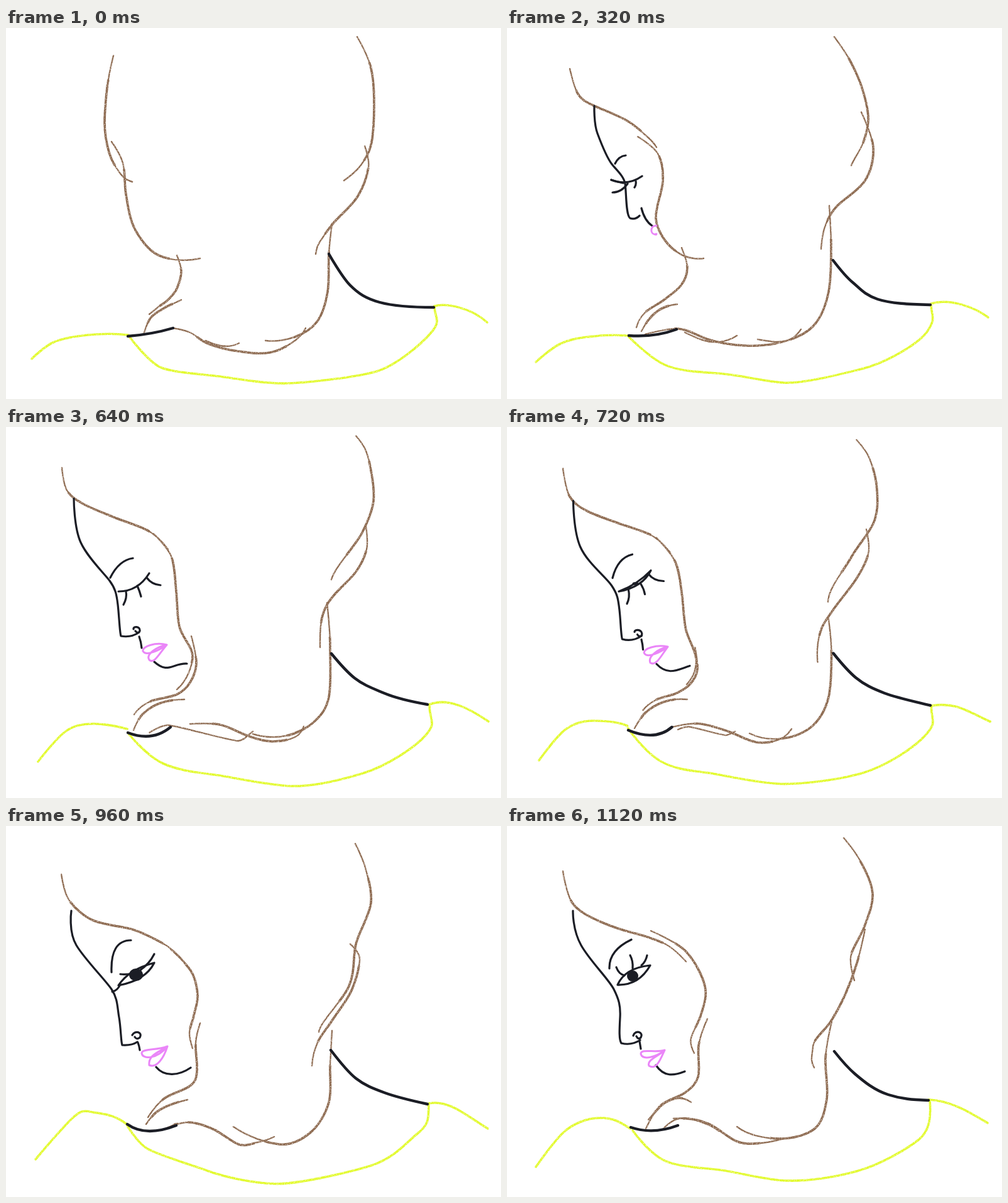
An HTML page without scripts that plays this animation: 788 px wide and 591 px high, repeating every 1200 ms.

```html
<!DOCTYPE html>
<html lang="en">
<head>
<meta charset="utf-8">
<title>Turning head</title>
<style>
html, body { margin: 0; width: 100%; height: 100%; overflow: hidden; background: #fff; }
svg { display: block; width: 788px; height: 591px; }
path { fill: none; stroke-linecap: round; stroke-linejoin: round; }
path, ellipse { animation: 1.2s steps(2) infinite; }
.brown path { stroke: #8d6a50; stroke-width: 2.4; }
.brown .mid { stroke-width: 3.7; stroke-dasharray: 64 36; stroke-dashoffset: -18; stroke-linecap: butt; }
.ink path { stroke: #1b1d25; stroke-width: 3.2; }
.ink .bold { stroke-width: 4.4; }
.lime path { stroke: #e2fa2c; stroke-width: 3.6; }
.pink path { stroke: #ea86f8; stroke-width: 3; }

/* moments at which parts come into view */
.turn, .face, .lower, .wisp { animation: 1.2s step-end infinite; }
.turn { animation-name: turn; }
.face { animation-name: face; }
.lower { animation-name: lower; }
.wisp { animation-name: wisp; }
@keyframes turn { 0% { opacity: 0 } 13.33%, 100% { opacity: 1 } }
@keyframes face { 0% { opacity: 0 } 26.66%, 100% { opacity: 1 } }
@keyframes lower { 0% { opacity: 0 } 33.33%, 100% { opacity: 1 } }
@keyframes wisp { 0%, 73.33%, 100% { opacity: 0 } 66.66% { opacity: 1 } }

.crown { animation-name: crown }
@keyframes crown {
0% { d: path("M559 14S575 42 580 60S586 100 586 120S585 166 582 182S573 207 566 217S548 236 538 243"); animation-timing-function: steps(4) }
26.66% { d: path("M521 14S538 37 545 50S559 77 564 92S574 125 575 140S572 167 568 180S554 205 548 219") }
40% { d: path("M546 15S561 30 566 40S575 63 577 75S582 95 581 110S576 148 570 165S549 200 544 212") }
53.33% { d: path("M557 14S569 28 573 38S580 62 582 75S587 102 585 118S577 149 566 170S524 222 518 243") }
66.66% { d: path("M556 27S575 47 581 62S594 95 595 115S596 158 585 180S543 223 530 245S500 290 504 314") }
80% { d: path("M556 28S569 54 573 70S583 102 581 122S562 168 557 188S556 232 546 255S500 312 498 328") }
93.33%, 100% { d: path("M536 19S554 40 562 55S581 90 582 108S575 143 569 160S548 196 547 210S551 239 553 246") }
}
.nape { animation-name: nape }
@keyframes nape {
0% { d: path("M571 188S579 209 577 222S569 253 560 268S531 299 521 311S505 332 500 340S495 350 493 360"); animation-timing-function: steps(4) }
26.66% { d: path("M564 134S582 172 583 190S580 227 570 243S536 272 525 284S510 306 506 317S501 338 500 352") }
40% { d: path("M570 153S579 180 578 195S571 231 561 246S526 276 515 288S499 307 495 318S489 338 491 354") }
53.33% { d: path("M573 159S577 183 574 195S565 220 556 232S531 257 522 268S508 286 504 300S500 330 500 351") }
66.66% { d: path("M571 167S579 191 577 205S566 234 556 252S526 298 516 315S497 341 493 355S485 378 489 398") }
80% { d: path("M548 188S563 200 563 212S557 246 550 262S528 296 519 310S501 333 496 345S488 366 487 382") }
93.33%, 100% { d: path("M570 165S563 198 558 215S546 251 539 267S524 298 515 312S488 338 487 352S482 372 489 385") }
}
.neck { animation-name: neck }
@keyframes neck {
0% { d: path("M519 311S515 342 514 360S515 402 512 420S504 456 495 468S474 487 460 492S430 500 413 498"); animation-timing-function: steps(4) }
26.66% { d: path("M513 283S516 327 516 350S516 400 512 420S501 459 490 472S460 494 445 498S418 499 399 496") }
40% { d: path("M513 296S511 318 512 330S517 353 517 370S516 414 512 430S503 458 495 465S460 485 439 483") }
53.33% { d: path("M511 280S516 325 516 350S518 410 514 430S501 460 490 470S461 489 445 492S412 495 393 489") }
66.66% { d: path("M512 327S517 353 517 370S515 412 510 430S497 468 485 480S453 499 435 500S395 499 379 487") }
80% { d: path("M519 326S517 361 516 380S519 422 514 440S498 477 485 488S455 509 435 507S385 495 362 479") }
93.33%, 100% { d: path("M518 307S508 349 507 370S512 416 509 435S502 472 490 482S455 498 435 498S385 494 366 479") }
}
.hem { animation-name: hem }
@keyframes hem {
0% { d: path("M265 478S284 481 293 485S309 498 322 503S354 513 370 515S402 520 420 517S470 496 477 478"); animation-timing-function: steps(4) }
26.66% { d: path("M220 488S255 478 272 479S302 490 320 496S360 505 380 506S425 504 440 500S460 491 468 480") }
40% { d: path("M313 474S338 477 350 481S373 491 385 496S412 504 425 503S454 500 465 492S484 472 491 456") }
53.33% { d: path("M293 473S325 471 340 474S371 487 385 492S412 501 425 501S452 498 460 494S470 486 474 477") }
66.66% { d: path("M230 484S254 471 270 471S309 474 325 480S353 498 368 503S394 505 405 502S424 493 432 485") }
80% { d: path("M258 480S278 472 290 472S317 477 330 483S359 503 370 507S390 506 400 504S419 499 427 495") }
93.33%, 100% { d: path("M248 483S262 467 275 466S305 468 320 474S351 496 365 502S393 506 405 505S430 501 440 498") }
}
.strand { animation-name: strand }
@keyframes strand {
0% { d: path("M318 498S327 502 333 504S346 507 352 507S365 505 371 502"); animation-timing-function: steps(4) }
26.66% { d: path("M283 485S302 494 311 497S329 501 338 500S357 496 366 490") }
40% { d: path("M236 478S255 474 270 477S309 492 325 493S353 492 366 485") }
53.33% { d: path("M228 487S246 475 258 475S360 501 370 500S385 490 393 485") }
66.66% { d: path("M316 477S320 479 322 480S326 482 327 482S332 484 333 485") }
80% { d: path("M256 481S261 479 263 478S267 476 268 475S273 474 274 474") }
93.33%, 100% { d: path("M265 466S282 465 290 466S307 471 315 474S331 481 337 486") }
}
.fringe { animation-name: fringe }
@keyframes fringe {
0% { d: path("M171 44S163 77 161 95S157 133 157 150S160 184 164 198S176 224 182 232S192 242 201 245"); animation-timing-function: steps(4) }
26.66% { d: path("M100 65S107 95 113 105S126 118 139 124S176 139 190 147S214 165 222 172S234 183 238 190") }
40% { d: path("M87 66S91 91 97 100S109 115 122 121S161 137 180 146S221 168 235 178S254 194 262 205") }
53.33% { d: path("M89 65S91 91 97 101S110 115 122 122S153 136 170 143S207 156 222 163S250 184 258 195") }
66.66% { d: path("M89 67S95 108 103 121S122 141 136 147S167 158 183 163S219 173 232 179S254 196 262 205") }
80% { d: path("M88 77S92 102 98 114S122 143 138 150S177 159 195 163S233 178 248 186S275 206 285 218") }
93.33%, 100% { d: path("M89 72S94 106 103 121S134 146 150 153S184 166 200 170S234 180 248 186S275 205 285 216") }
}
.lock { animation-name: lock }
@keyframes lock {
0% { d: path("M168 181S182 201 186 215S188 247 191 265S197 306 206 322S228 356 245 363S285 372 309 367"); animation-timing-function: steps(4) }
26.66% { d: path("M208 173S233 188 240 200S249 228 248 245S236 286 237 303S250 339 262 350S290 370 313 367") }
40% { d: path("M235 178S261 201 268 215S277 248 279 265S282 300 286 315S298 344 298 357S293 384 288 395") }
53.33% { d: path("M235 170S257 191 263 206S269 243 271 262S272 301 276 318S297 350 297 365S288 405 272 418") }
66.66% { d: path("M240 182S264 207 272 222S283 255 286 272S290 308 293 325S304 360 305 375S304 394 300 402") }
80% { d: path("M262 196S288 220 295 232S304 256 305 268S301 292 299 302S292 321 292 330S295 348 297 354") }
93.33%, 100% { d: path("M229 167S271 185 285 200S311 238 315 255S313 286 309 300S295 328 293 338S295 355 298 362") }
}
.throat { animation-name: throat }
@keyframes throat {
0% { d: path("M272 362S279 379 279 388S275 408 272 415S263 428 258 433S248 440 243 444S233 452 228 456"); animation-timing-function: steps(4) }
26.66% { d: path("M278 350S287 372 287 382S283 402 277 410S259 426 250 433S227 446 220 453S209 466 206 477") }
40% { d: path("M290 348S301 372 302 382S299 401 294 408S282 422 272 427S246 433 235 438S214 450 206 460") }
53.33% { d: path("M295 333S303 363 303 375S298 399 293 407S282 421 272 426S241 432 230 437S210 448 204 458") }
66.66% { d: path("M304 370S305 390 303 397S296 408 290 412S275 419 268 422S251 428 245 432S234 439 229 444") }
80% { d: path("M309 314S303 332 302 345S305 378 304 390S302 407 293 414S263 426 252 434S233 453 226 464") }
93.33%, 100% { d: path("M319 307S307 335 305 350S308 388 304 400S293 418 283 425S255 436 245 445S228 468 221 482") }
}
.curl { animation-name: curl }
@keyframes curl {
0% { d: path("M220 485S225 469 230 462S244 451 252 446S270 438 279 433"); animation-timing-function: steps(4) }
26.66% { d: path("M214 483S221 470 226 464S238 451 246 447S261 441 271 440") }
40% { d: path("M191 481S203 468 210 463S227 455 235 451S252 444 260 440") }
53.33% { d: path("M203 483S210 465 217 458S234 444 245 440S270 434 284 434") }
66.66% { d: path("M203 477S217 457 225 451S240 441 251 437S272 431 290 434") }
80% { d: path("M223 475S232 462 238 457S254 447 262 444S280 438 289 436") }
93.33%, 100% { d: path("M225 468S240 450 247 444S260 436 268 434S284 434 293 440") }
}
.strap { animation-name: strap }
@keyframes strap {
0% { d: path("M514 360S535 397 548 410S573 431 595 437S650 445 681 445"); animation-timing-function: steps(4) }
26.66% { d: path("M519 370S538 395 550 405S569 425 590 432S640 440 674 441") }
40% { d: path("M517 357S541 385 553 396S579 419 598 425S645 436 669 440") }
53.33% { d: path("M518 361S541 389 555 400S583 416 602 424S648 438 671 442") }
66.66% { d: path("M521 360S543 388 556 399S580 417 600 424S655 438 677 445") }
80% { d: path("M517 357S543 391 557 402S584 418 603 425S648 438 671 443") }
93.33%, 100% { d: path("M521 359S540 383 554 395S585 421 607 428S645 436 671 437") }
}
.tab { animation-name: tab }
@keyframes tab {
0% { d: path("M194 491Q232 488 266 478"); animation-timing-function: steps(4) }
26.66% { d: path("M194 490Q235 493 270 480") }
40% { d: path("M190 492Q230 500 266 481") }
53.33% { d: path("M194 487Q233 502 262 478") }
66.66% { d: path("M192 479Q240 500 263 478") }
80% { d: path("M193 475Q222 496 271 477") }
93.33%, 100% { d: path("M197 480Q232 492 272 477") }
}
.sleeve { animation-name: sleeve }
@keyframes sleeve {
0% { d: path("M41 527S62 506 77 500S110 491 130 489S170 486 195 489"); animation-timing-function: steps(4) }
26.66% { d: path("M46 532S70 510 85 503S112 494 130 492S165 488 189 490") }
40% { d: path("M54 540S78 510 92 500S124 487 140 485S172 484 190 492") }
53.33% { d: path("M51 533S77 500 91 488S118 474 133 473S172 475 193 481") }
66.66% { d: path("M51 529S75 492 90 480S122 462 140 463S180 463 190 471") }
80% { d: path("M47 531S85 486 104 467S128 455 145 457S178 464 191 474") }
93.33%, 100% { d: path("M46 543S75 502 90 488S128 465 148 465S178 470 196 482") }
}
.collar { animation-name: collar }
@keyframes collar {
0% { d: path("M195 490S227 533 247 541S309 551 340 555S400 565 435 566S560 556 590 547S660 505 677 485S682 462 682 443"); animation-timing-function: steps(4) }
26.66% { d: path("M192 490S225 524 250 536S314 548 345 551S410 563 440 565S525 553 565 543S657 502 670 482S676 460 675 441") }
40% { d: path("M190 492S225 522 252 534S314 547 345 552S402 563 430 564S525 556 570 547S648 512 664 492S672 470 672 441") }
53.33% { d: path("M194 487S222 523 250 536S314 551 345 556S420 571 455 572S534 562 570 551S652 510 669 490S674 468 674 443") }
66.66% { d: path("M191 472S217 516 245 532S292 544 315 549S385 564 415 565S520 563 560 552S645 512 665 490S676 468 677 446") }
80% { d: path("M191 474S208 504 225 514S290 538 320 549S395 569 428 570S538 554 578 542S635 506 655 490S672 465 673 443") }
93.33%, 100% { d: path("M200 485S222 516 245 530S310 544 340 548S412 564 445 565S522 560 560 549S640 512 655 500S676 470 673 436") }
}
.arm { animation-name: arm }
@keyframes arm {
0% { d: path("M682 443C700 438 740 445 766 469"); animation-timing-function: steps(4) }
26.66% { d: path("M675 439C705 430 745 445 766 461") }
40% { d: path("M672 441C700 433 745 447 767 471") }
53.33% { d: path("M674 442C705 430 740 450 768 469") }
66.66% { d: path("M677 446C725 446 720 453 771 470") }
80% { d: path("M673 442C705 435 735 463 767 482") }
93.33%, 100% { d: path("M671 436C705 437 735 455 765 473") }
}
.profile { animation-name: profile }
@keyframes profile {
0% { d: path("M160 125S158 150 160 165S165 200 168 205S172 215 175 220S180 230 182 235Q184 238 186 240"); animation-timing-function: steps(4) }
26.66% { d: path("M139 124S138 152 144 168S160 208 167 217S186 236 188 248S189 299 196 303Q204 306 211 299") }
40% { d: path("M122 117S123 162 131 180S157 226 165 240S174 262 177 275S182 315 183 319Q196 323 208 313") }
53.33% { d: path("M108 114S108 160 119 184S156 233 165 245S176 266 178 283S181 328 183 333Q199 336 212 327") }
66.66% { d: path("M103 121S103 170 114 197S158 244 168 260S178 282 180 300S182 340 184 343Q200 349 216 339") }
80% { d: path("M104 135S99 168 112 190S158 245 168 260S177 288 180 305S183 345 185 349Q200 350 209 344") }
93.33%, 100% { d: path("M105 135S104 165 118 190S162 244 170 260S181 286 180 305S178 340 182 346Q198 350 212 341") }
}
.lipline { animation-name: lipline }
@keyframes lipline {
26.66% { d: path("M214 287Q219 307 231 315") }
40% { d: path("M205 311Q212 322 217 335") }
53.33% { d: path("M212 334Q215 342 216 352") }
66.66% { d: path("M216 343Q217 350 217 357") }
80% { d: path("M210 345Q212 350 213 357") }
93.33%, 100% { d: path("M211 343Q212 349 213 355") }
}
.nostril { animation-name: nostril }
@keyframes nostril {
26.66% { d: path("M206 301C207 300 209 300 210 300Q211 300 211 299") }
40% { d: path("M199 309C202 305 208 306 208 312Q208 313 207 313") }
53.33% { d: path("M203 322C202 317 214 317 213 325Q210 330 206 325") }
66.66% { d: path("M203 331C205 325 220 328 216 339Q211 341 209 336") }
80% { d: path("M201 333C205 325 218 328 213 337Q208 341 205 336") }
93.33%, 100% { d: path("M201 334C204 324 218 328 213 337Q209 341 206 335") }
}
.brow { animation-name: brow }
@keyframes brow {
26.66% { d: path("M172 216Q178 204 189 203") }
40% { d: path("M167 238Q177 212 199 210") }
53.33% { d: path("M166 240Q180 212 202 209") }
66.66% { d: path("M170 241Q172 205 197 197") }
80% { d: path("M168 233Q166 182 199 182") }
93.33%, 100% { d: path("M163 227Q162 198 198 181") }
}
.eye { animation-name: eye }
@keyframes eye {
26.66% { d: path("M166 242Q192 252 215 236Q192 252 166 242") }
40% { d: path("M176 262Q207 260 223 238Q207 260 176 262") }
53.33% { d: path("M179 262Q210 262 228 233Q210 262 179 262") }
66.66% { d: path("M177 262Q205 240 230 224Q222 248 177 262") }
80% { d: path("M179 254Q196 228 236 218Q222 246 179 254") }
93.33%, 100% { d: path("M176 253Q188 226 228 222Q210 254 176 253") }
}
.lashes { animation-name: lashes }
@keyframes lashes {
26.66% { d: path("M168 262Q182 262 192 248M203 254Q206 250 205 244M166 242Q175 245 185 247") }
40% { d: path("M159 278Q170 275 180 262M202 276Q202 268 201 259M222 258Q219 254 217 247") }
53.33% { d: path("M187 283Q193 272 191 262M215 270Q213 262 209 253M246 252Q232 251 224 240") }
66.66% { d: path("M195 280Q199 270 196 258M224 263Q223 254 217 247M253 239Q236 240 226 228") }
80% { d: path("M169 264Q178 262 182 252M182 236Q200 238 215 229M236 204Q228 220 213 230") }
93.33%, 100% { d: path("M174 225Q178 236 187 238M196 206Q201 215 200 227M223 206Q221 216 214 222") }
}
.iris { fill: #1b1d25; animation-name: iris }
@keyframes iris {
0%, 53.33% { cx: 205px; cy: 252px; rx: 0; ry: 0 }
66.66% { cx: 204px; cy: 247px; rx: 10px; ry: 5px }
80% { cx: 207px; cy: 237px; rx: 11px; ry: 10px }
93.33%, 100% { cx: 200px; cy: 239px; rx: 9px; ry: 9px }
}
.mouth { animation-name: mouth }
@keyframes mouth {
26.66% { d: path("M238 315C228 314 227 328 236 329C238 329 238 329 237 329C237 329 237 329 237 328C238 328 238 328 238 328") }
40% { d: path("M253 332C235 326 214 335 219 343C222 350 245 340 253 332C240 338 225 345 226 353C232 360 243 350 253 332") }
53.33% { d: path("M256 347C238 342 216 350 218 357C223 366 245 355 256 347C240 350 222 362 228 371C236 378 243 362 256 347") }
66.66% { d: path("M256 353C238 350 216 356 219 364C225 372 245 362 256 353C240 358 226 368 228 380C238 386 247 368 256 353") }
80% { d: path("M257 351C240 358 216 354 216 362C217 372 240 372 257 351C245 360 226 364 228 381C240 386 251 370 257 351") }
93.33%, 100% { d: path("M251 357C236 362 213 354 213 363C216 374 238 368 251 357C243 366 222 372 226 382C238 390 245 370 251 357") }
}
.chin { animation-name: chin }
@keyframes chin {
26.66% { d: path("M236 328C238 330 240 332 242 335") }
40% { d: path("M241 356C260 375 275 355 295 364") }
53.33% { d: path("M236 374C258 394 265 376 288 377") }
66.66% { d: path("M240 381C255 400 278 397 294 384") }
80% { d: path("M239 384C252 400 275 398 294 385") }
93.33%, 100% { d: path("M237 381C250 400 265 398 283 391") }
}
</style>
</head>
<body>
<svg viewBox="0 0 788 591">
  <filter id="grain" filterUnits="userSpaceOnUse" x="0" y="0" width="788" height="591" color-interpolation-filters="sRGB">
    <feTurbulence type="fractalNoise" baseFrequency=".6" numOctaves="2" seed="4"/>
    <feColorMatrix values="0 0 0 0 0  0 0 0 0 0  0 0 0 0 0  2.4 0 0 0 -.2"/>
    <feComposite in="SourceGraphic" operator="in"/>
  </filter>
  <g filter="url(#grain)">
    <g class="lime">
      <path class="sleeve"/><path class="collar"/><path class="arm"/>
    </g>
    <g class="brown">
      <path class="crown"/><path class="crown mid" pathLength="100"/>
      <path class="nape"/><path class="nape mid" pathLength="100"/>
      <path class="neck"/><path class="neck mid" pathLength="100"/>
      <path class="hem"/><path class="hem mid" pathLength="100"/>
      <path class="fringe"/><path class="fringe mid" pathLength="100"/>
      <path class="lock"/><path class="lock mid" pathLength="100"/>
      <path class="throat"/><path class="throat mid" pathLength="100"/>
      <path class="curl"/><path class="curl mid" pathLength="100"/>
      <path class="strand"/>
      <g class="wisp"><path d="M281 235Q291 268 291 300"/></g>
    </g>
  </g>
  <g class="ink">
    <path class="strap bold"/><path class="tab bold"/>
    <g class="turn"><path class="profile"/></g>
    <g class="face">
      <path class="lipline"/><path class="brow"/><path class="eye"/><path class="lashes"/>
      <ellipse class="iris"/>
    </g>
    <g class="lower"><path class="nostril"/><path class="chin"/></g>
  </g>
  <g class="pink face"><path class="mouth"/></g>
</svg>
</body>
</html>
```
